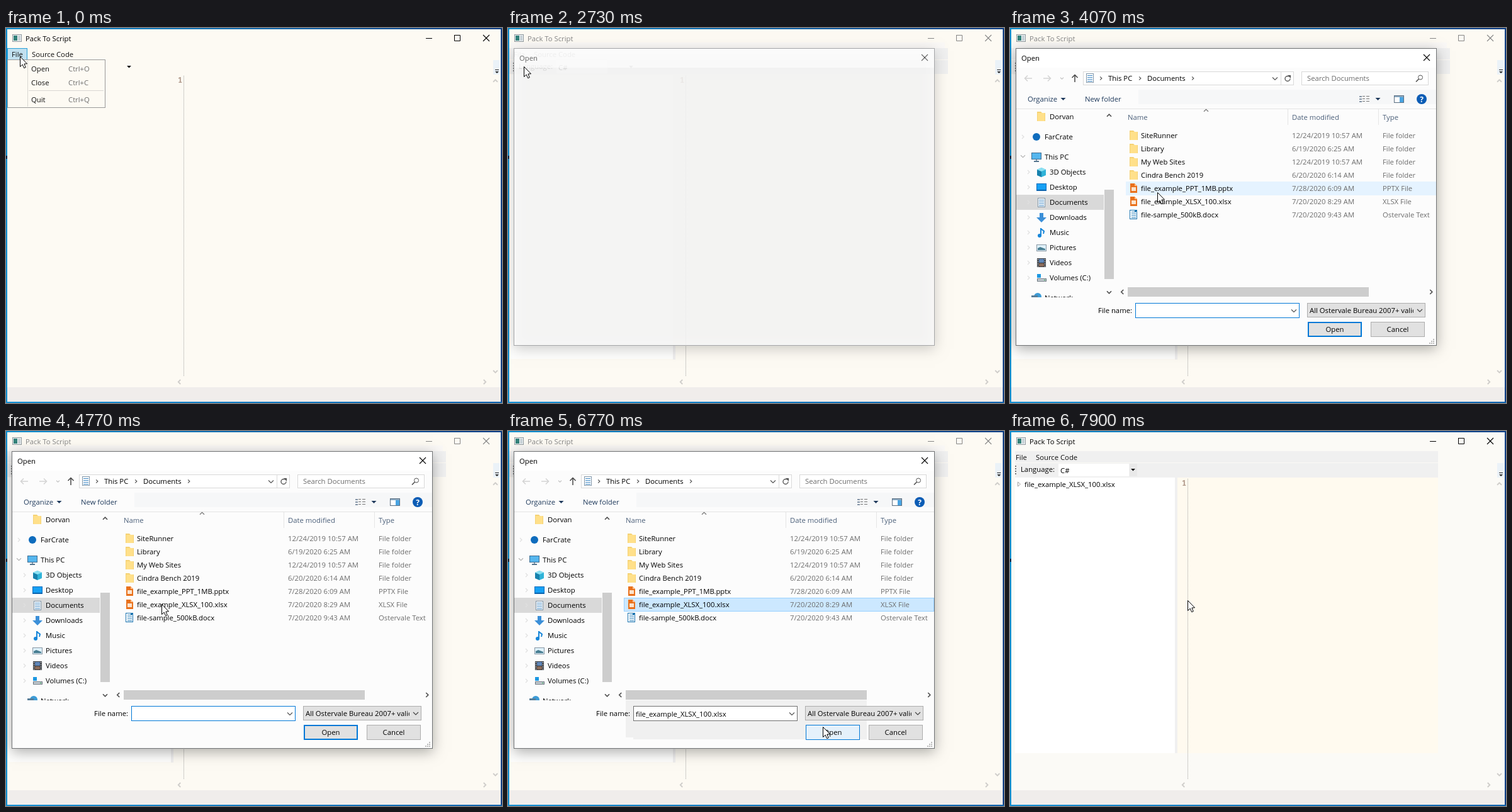
Animation, 788 px wide and 596 px high, one loop 8 s. Source, as an HTML page with a canvas:

```html
<!DOCTYPE html>
<html lang="en">
<head>
<meta charset="utf-8">
<title>Open dialog</title>
<style>
html, body { margin: 0; width: 100%; height: 100%; overflow: hidden; background: #fdfaf3; }
canvas { display: block; width: 788px; height: 596px; }
</style>
</head>
<body>
<canvas id="stage" width="788" height="596"></canvas>
<script>
const g = document.getElementById('stage').getContext('2d');
const LOOP = 8000;
const FONT = '11.3px "Open Sans", "Noto Sans", sans-serif';
const BLUE = '#0078d7', GREY = '#6d6d6d', HEAD = '#4c607a';

// time, x, y of the pointer tip
const POINTER = [
  [0, 22, 45], [430, 22, 48], [550, 22, 54], [670, 22, 57], [790, 22, 59], [1350, 25, 61],
  [3560, 55, 87], [3710, 104, 139], [3830, 160, 196], [3950, 207, 240], [4070, 234, 261],
  [4190, 330, 290], [4340, 411, 312], [4490, 247, 275], [5690, 331, 364], [5810, 394, 429],
  [5960, 424, 437], [6110, 470, 455], [6230, 518, 468], [6380, 500, 470], [7470, 495, 460],
  [7900, 282, 269]
];

const FILES = [
  ['SiteRunner', '12/24/2019 10:57 AM', 'File folder', 'folder'],
  ['Library', '6/19/2020 6:25 AM', 'File folder', 'folder'],
  ['My Web Sites', '12/24/2019 10:57 AM', 'File folder', 'folder'],
  ['Cindra Bench 2019', '6/20/2020 6:14 AM', 'File folder', 'folder'],
  ['file_example_PPT_1MB.pptx', '7/28/2020 6:09 AM', 'PPTX File', 'orange'],
  ['file_example_XLSX_100.xlsx', '7/20/2020 8:29 AM', 'XLSX File', 'orange'],
  ['file-sample_500kB.docx', '7/20/2020 9:43 AM', 'Ostervale Text', 'text']
];
const PLACES = ['3D Objects', 'Desktop', 'Documents', 'Downloads', 'Music', 'Pictures', 'Videos', 'Volumes (C:)'];
const CHOSEN = FILES[5][0];

function rect(x, y, w, h, fill) {
  g.fillStyle = fill;
  g.fillRect(x, y, w, h);
}

function box(x, y, w, h, fill, border, weight = 1) {
  rect(x, y, w, h, fill);
  g.strokeStyle = border;
  g.lineWidth = weight;
  g.strokeRect(x + weight / 2, y + weight / 2, w - weight, h - weight);
}

function text(s, x, y, color = '#000', align = 'left') {
  g.font = FONT;
  g.textAlign = align;
  g.fillStyle = color;
  g.fillText(s, x, y);
}

function line(points, color, width = 1) {
  g.beginPath();
  points.forEach(([x, y]) => g.lineTo(x, y));
  g.strokeStyle = color;
  g.lineWidth = width;
  g.stroke();
}

function shape(points, fill) {
  g.beginPath();
  points.forEach(([x, y]) => g.lineTo(x, y));
  g.closePath();
  g.fillStyle = fill;
  g.fill();
}

function disc(x, y, r, fill) {
  g.beginPath();
  g.arc(x, y, r, 0, 7);
  g.fillStyle = fill;
  g.fill();
}

function clipped(x, y, w, h, draw) {
  g.save();
  g.beginPath();
  g.rect(x, y, w, h);
  g.clip();
  draw();
  g.restore();
}

function chevron(x, y, dir, color, r = 3.5, width = 1.2) {
  g.save();
  g.translate(x, y);
  g.rotate({ right: 0, down: 1, left: 2, up: 3 }[dir] * Math.PI / 2);
  line([[-r / 2, -r], [r / 2, 0], [-r / 2, r]], color, width);
  g.restore();
}

function triangle(x, y, r, color) {
  shape([[x - r, y], [x + r, y], [x, y + r]], color);
}

function arrow(x, y, dir, color) {
  g.save();
  g.translate(x, y);
  g.rotate({ right: 0, left: Math.PI, up: -Math.PI / 2 }[dir]);
  line([[-6, 0], [5, 0]], color, 1.5);
  line([[1, -4.5], [5.5, 0], [1, 4.5]], color, 1.5);
  g.restore();
}

function cross(x, y, color) {
  line([[x - 5, y - 5], [x + 5, y + 5]], color, 1.1);
  line([[x - 5, y + 5], [x + 5, y - 5]], color, 1.1);
}

const icons = {
  folder(x, y) {
    shape([[x, y], [x + 6, y], [x + 8, y + 2], [x + 13, y + 2], [x + 13, y + 15], [x, y + 15]], '#f5d274');
    rect(x + 1, y + 2, 11, 13, '#ffe08a');
  },
  orange(x, y) {
    shape([[x + 1, y], [x + 8, y], [x + 12, y + 4], [x + 12, y + 15], [x + 1, y + 15]], '#e9711c');
    shape([[x + 8, y], [x + 12, y + 4], [x + 8, y + 4]], '#ffc08a');
    rect(x + 3, y + 6, 7, 6, '#fbe3cc');
  },
  text(x, y) {
    box(x, y, 12, 15, '#fff', '#1d75b0');
    for (let i = 0; i < 4; i++) rect(x + 3, y + 3 + i * 3, 7, 1, '#2c83bd');
    rect(x + 8, y, 4, 3, '#1d75b0');
  },
  page(x, y) {
    box(x, y, 12, 15, '#fff', '#7f95a8');
    for (let i = 0; i < 4; i++) rect(x + 2, y + 3 + i * 3, 8, 1, '#3c87c4');
  },
  screen(x, y) {
    box(x, y, 16, 11, '#55b6ee', '#3d6c91');
    rect(x + 4, y + 13, 8, 2, '#56758e');
    rect(x + 7, y + 11, 2, 2, '#8aa2b4');
  }
};

const placeIcons = [
  y => {
    shape([[50, y - 7], [57, y - 4], [57, y + 5], [50, y + 8], [43, y + 5], [43, y - 4]], '#30b3d8');
    shape([[43, y - 4], [50, y - 1], [50, y + 8], [43, y + 5]], '#1781ad');
    shape([[43, y - 4], [50, y - 7], [57, y - 4], [50, y - 1]], '#8ce0f2');
  },
  y => { box(42, y - 6, 16, 12, '#16a0f4', '#0a6bbb'); rect(43, y + 4, 14, 1, '#0a5c9f'); },
  y => icons.page(44, y - 7),
  y => shape([[47, y - 7], [53, y - 7], [53, y], [58, y], [50, y + 8], [42, y], [47, y]], '#3b8fd8'),
  y => {
    rect(48, y - 7, 2, 13, '#1686d9');
    line([[49, y - 6], [54, y - 2], [53, y + 2]], '#1686d9', 2);
    disc(47, y + 5, 3, '#1686d9');
  },
  y => {
    box(42, y - 5, 16, 11, '#dff1fb', '#8796a2');
    shape([[44, y + 4], [44, y + 1], [48, y - 1], [56, y + 2], [56, y + 4]], '#477d91');
  },
  y => {
    rect(43, y - 7, 14, 14, '#34383e');
    rect(46, y - 6, 8, 6, '#5f86b8');
    rect(46, y + 1, 8, 5, '#8a6a59');
    for (let i = 0; i < 4; i++) {
      rect(44, y - 6 + i * 3.5, 1, 2, '#ddd');
      rect(55, y - 6 + i * 3.5, 1, 2, '#ddd');
    }
  },
  y => {
    rect(43, y - 6, 6, 6, '#1c98e2');
    box(43, y + 1, 15, 5, '#c5ccd2', '#68737c');
    rect(54, y + 3, 2, 1, '#2eae4e');
  }
];

function blend(from, to) {
  const fill = g.createLinearGradient(0, 0, 788, 0);
  fill.addColorStop(0, from);
  fill.addColorStop(1, to);
  return fill;
}

function desktopEdge() {
  rect(0, 0, 788, 596, blend('#0b8fd0', '#0b3f86'));
  rect(0, 594, 788, 2, blend('#1590d4', '#0d63ae'));
  rect(0, 203, 2, 5, '#0c2746');
}

function mainWindow(t, active) {
  const ink = active ? '#000' : '#858585';
  const late = t >= 7200;
  desktopEdge();
  rect(2, 2, 784, 592, late ? '#fbfaf6' : '#fdfaf3');
  rect(2, 571, 784, 23, '#f0edeb');

  if (late) {
    rect(8, 32, 672, 18, '#f0f0f0');
    rect(8, 51, 672, 23, '#f0f0f0');
    rect(8, 74, 254, 438, '#fff');
    rect(262, 74, 4, 438, '#f0f0f0');
    rect(266, 74, 414, 438, '#fffaef');
  } else if (t >= 1500) {
    rect(2, 32, 34, 18, '#f0f0f0');
    rect(5, 51, 72, 22, '#f3f2f1');
    rect(5, 74, 153, 53, '#fff');
  }
  if (t >= 2730 && !late) {
    rect(4, 23, 690, 9, '#faf8f6');
    rect(2, 32, 697, 18, '#f0f0f0');
    rect(2, 51, 697, 22, '#f0f0f0');
    rect(4, 74, 258, 452, '#fefefd');
    rect(262, 504, 4, 23, '#efeeee');
  }

  box(10, 10, 15, 12, '#f4f7f8', '#8d979d');
  rect(12, 12, 6, 8, '#328279');
  rect(19, 12, 4, 8, '#c8d3d8');
  text('Pack To Script', 31, 21, ink);
  rect(667, 16, 10, 1, ink);
  line([[712.5, 11.5], [721.5, 11.5], [721.5, 20.5], [712.5, 20.5], [712.5, 11]], ink);
  cross(763, 16, ink);

  if (t < 1620) box(2, 32, 32, 19, '#c1e0ef', '#26a0da');
  text('File', 9, 46, '#111');
  text('Source Code', 41, 46, '#111');

  if (t >= 1500) {
    for (let y = 55; y < 69; y += 4) rect(8, y, 2, 2, '#777');
    text('Language:', 17, 65);
    if (late) {
      rect(77, 52, 112, 20, '#fff');
      rect(190, 52, 12, 20, '#e9e9e9');
    } else {
      rect(77, 51, 81, 22, '#fff');
      rect(77, 72, 81, 1, '#eee');
      rect(77, 50, 81, 1, '#eee');
    }
    text('C#', 80, 67);
  }
  triangle(195.5, 60, 3.4, '#000');

  rect(774, 51, 11, 23, '#ebf2f8');
  rect(777, 66, 6, 1, '#222');
  triangle(780, 69, 3, '#222');

  g.font = 'bold 12px "Noto Sans Mono", "DejaVu Sans Mono", monospace';
  g.textAlign = 'left';
  g.fillStyle = '#b29a8c';
  g.fillText('1', 273, 87);
  for (let y = 76; y < 554; y += 2) rect(282, y, 1, 1, '#a4a4a2');
  chevron(777.5, 84, 'up', '#cfcdca', 3.5, 1.8);
  chevron(777.5, 546, 'down', '#cfcdca', 3.5, 1.8);
  chevron(275.5, 562.5, 'left', '#cfcdca', 3.5, 1.8);
  chevron(760.5, 562.5, 'right', '#cfcdca', 3.5, 1.8);

  if (t >= 7470) {
    line([[12.5, 81], [16.5, 84.5], [12.5, 88], [12.5, 81]], '#a0a0a0');
    text(CHOSEN, 23, 89);
  }
}

function menu(t) {
  box(2, 50, 156, 77, '#fdfaf3', '#999');
  rect(34, 52, 1, 73, '#d9d7d3');
  rect(36, 99, 119, 1, '#d9d7d3');
  if (t >= 550) box(5, 54, 150, 22, '#c9e5f2', '#26a0da');
  [['Open', 'O', 69], ['Close', 'C', 91], ['Quit', 'Q', 118]].forEach(([name, key, y]) => {
    text(name, 40, y, '#111');
    text('Ctrl+' + key, 99, y, '#707070');
  });
}

function navigation(t) {
  arrow(29, 80, 'left', '#d3d3d3');
  arrow(59, 80, 'right', '#d3d3d3');
  chevron(82.5, 80, 'down', '#c4c4c4', 2.5);
  arrow(103, 80, 'up', '#444');
  box(116, 69, 335, 22, '#fff', '#d9d9d9');
  rect(430, 69, 1, 22, '#d9d9d9');
  icons.page(121, 72);
  chevron(144.5, 80, 'right', '#555', 2.7);
  text('This PC', 156, 84);
  chevron(206.5, 80, 'right', '#555', 2.7);
  text('Documents', 218, 84);
  chevron(421, 80.5, 'down', '#555', 4);
  g.beginPath();
  g.arc(441, 80.5, 4, 0, 5.2);
  g.strokeStyle = '#555';
  g.lineWidth = 1.4;
  g.stroke();
  shape([[441, 75], [446, 75], [446, 80]], '#555');

  if (t < 3280) {
    rect(463, 69, 1, 22, '#d9d9d9');
    rect(664, 69, 1, 22, '#d9d9d9');
  } else {
    rect(204, 98, 473, 23, '#f6f7f8');
    chevron(290.5, 80, 'right', '#555', 2.7);
    box(463, 69, 202, 22, '#fff', '#d9d9d9');
    text('Search Documents', 472, 84, GREY);
    g.beginPath();
    g.arc(652, 78.5, 3.5, 0, 7);
    g.strokeStyle = '#555';
    g.stroke();
    line([[649.5, 81], [645, 85.5]], '#555', 1.7);
    text('Organize', 28, 117, '#1e395b');
    triangle(84.5, 111, 4, '#1e395b');
    text('New folder', 119, 117, '#1e395b');
    for (let y = 108; y < 119; y += 4) {
      rect(555, y, 4, 2, '#8494a6');
      rect(560, y, 4, 1, '#777');
      rect(566, y, 5, 1, '#777');
    }
    triangle(584.5, 111, 4, '#1e395b');
  }
  box(610, 107, 16, 12, '#fff', '#5b6f82');
  rect(611, 108, 14, 2, '#8ba9c1');
  rect(619, 110, 6, 8, '#49a4e2');
  disc(654, 113, 8, '#0b5cb5');
  g.font = 'bold 12px "Open Sans", sans-serif';
  g.textAlign = 'center';
  g.fillStyle = '#fff';
  g.fillText('?', 654, 117.5);
}

function tree(t) {
  rect(10, 265, 139, 24, '#d9d9d9');
  icons.folder(43, 133);
  text('Dorvan', 63, 145);
  disc(42, 173, 6, '#0f6cbd');
  text('FarCrate', 55, 177);
  icons.screen(34, 198);
  text('This PC', 55, 209);
  PLACES.forEach((name, i) => {
    const y = 229 + i * 24;
    placeIcons[i](y);
    text(name, 63, y + 4);
    if (t >= 3710) chevron(29.5, y, 'right', '#e0e0e0', 3);
  });
  if (t >= 3710) {
    chevron(20.5, 173, 'right', '#e0e0e0', 3);
    chevron(20.5, 204, 'down', '#b5b5b5', 3.5);
  }
  clipped(10, 415, 138, 13, () => {
    disc(44, 427, 6, '#3c9bd6');
    rect(34, 425, 10, 5, '#577d98');
    text('Network', 55, 433);
  });
  chevron(157.5, 139, 'up', '#505050', 3.5, 1.7);
  chevron(157.5, 420, 'down', '#505050', 3.5, 1.7);
  rect(150, 257, 15, 142, '#cdcdcd');
}

function fileList(t) {
  rect(10, 128, 667, 1, '#e3e3e3');
  text('Name', 187, 146, HEAD);
  text('Date modified', 448, 146, HEAD);
  text('Type', 592, 146, HEAD);
  rect(441, 129, 1, 25, '#e5e5e5');
  rect(585, 129, 1, 25, '#e5e5e5');
  chevron(311.5, 131, 'up', '#777', 3.5);

  if (t >= 4070 && t < 4190) rect(184, 244, 493, 22, '#e5f3ff');
  if (t >= 7050) rect(184, 265, 493, 22, '#d9d9d9');
  else if (t >= 5170) box(184, 265, 493, 22, '#cce8ff', '#99d1ff');
  else if (t >= 5050) rect(184, 265, 493, 22, '#e5f3ff');

  clipped(170, 150, 506, 200, () => FILES.forEach(([name, date, kind, icon], i) => {
    const y = 175 + i * 21;
    icons[icon](190, y - 12);
    text(name, 208, y);
    text(date, 448, y, GREY);
    text(kind, 592, y, GREY);
  }));
  chevron(178.5, 419.5, 'left', '#505050', 3.5, 1.7);
  chevron(669, 419.5, 'right', '#505050', 3.5, 1.7);
  rect(187, 412, 383, 15, '#cdcdcd');
}

function footer(t) {
  if (t >= 6110) {
    rect(187, 428, 383, 59, '#f0f0f0');
    rect(199, 487, 371, 3, '#f0f0f0');
  }
  text('File name:', 194, 453, '#000', 'right');
  const edge = t < 5290 ? BLUE : t >= 6110 && t < 6530 ? '#333' : '#707070';
  box(199, 437, 261, 24, '#fff', edge);
  if (t >= 5290) text(CHOSEN, 203, 454);
  else if (t < 3710 || (t >= 4190 && t < 4770)) rect(203, 442, 1, 15, '#000');
  chevron(451, 449.5, 'down', '#555', 4);

  box(472, 437, 188, 23, '#e1e1e1', '#adadad');
  clipped(474, 438, 167, 21, () => text('All Ostervale Bureau 2007+ valid', 476, 453));
  chevron(651, 449, 'down', '#444', 4);

  if (t >= 7050) box(473, 467, 86, 24, '#cce4f7', '#005499');
  else if (t >= 6380) box(473, 467, 86, 24, '#e5f1fb', BLUE);
  else box(473, 467, 86, 24, '#e1e1e1', BLUE, 2);
  text('Open', 516, 483, '#000', 'center');
  box(573, 467, 86, 24, '#e1e1e1', '#adadad');
  text('Cancel', 616, 483, '#000', 'center');
  for (let r = 0; r < 3; r++)
    for (let c = 2 - r; c < 3; c++) rect(666 + c * 3, 494 + r * 3, 2, 2, '#b9b9b9');
}

function dialog(t) {
  g.save();
  if (t < 2860) g.globalAlpha = 0.6;
  if (t >= 7200) g.globalAlpha = 0.3;
  g.save();
  g.shadowColor = 'rgba(0,0,0,.32)';
  g.shadowBlur = 20;
  g.shadowOffsetY = 5;
  rect(9, 32, 669, 473, '#fcfcfc');
  g.restore();
  box(9, 32, 669, 473, '#fcfcfc', '#6f7173');
  rect(10, 33, 667, 30, '#fff');
  text('Open', 18, 52);
  cross(662, 47, '#000');
  if (t >= 3000) {
    navigation(t);
    footer(t);
  }
  if (t >= 3130) {
    tree(t);
    fileList(t);
  }
  g.restore();
}

function pointer(t) {
  const [, x, y] = POINTER.findLast(p => p[0] <= t);
  g.save();
  g.translate(x + 0.5, y + 0.5);
  const outline = [[0, 0], [0, 16], [3.7, 12.6], [6.2, 18.2], [8.8, 17.1], [6.4, 11.6], [11, 11.3]];
  shape(outline, '#fff');
  line([...outline, [0, 0]], '#000');
  g.restore();
}

function draw(t) {
  mainWindow(t, t < 2180 || t >= 7320);
  if (t < 1620) {
    g.globalAlpha = t < 1500 ? 1 : 0.5;
    menu(t);
    g.globalAlpha = 1;
  }
  if (t >= 2730 && t < 7320) dialog(t);
  pointer(t);
}

const start = performance.now();
function tick(now) {
  draw(Math.max(0, now - start) % LOOP);
  requestAnimationFrame(tick);
}
tick(start);
</script>
</body>
</html>
```
